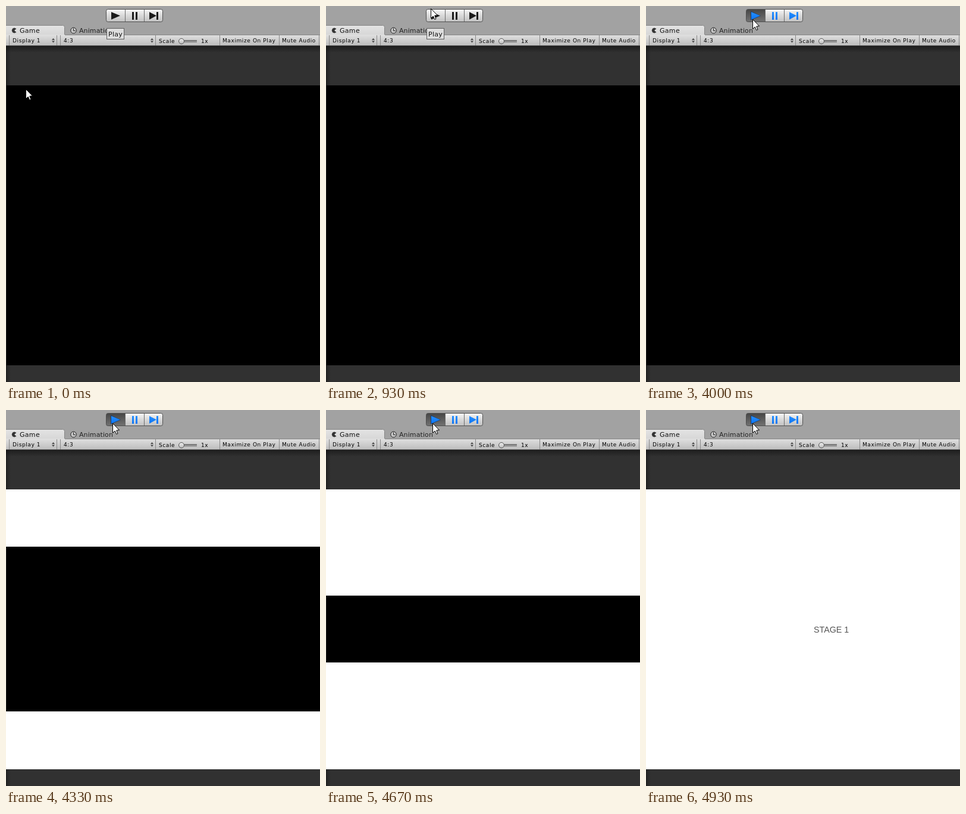
Recreate the animation shown at these times as an HTML page with a canvas. Size 528 by 630 pixels, loop 8000 ms.

```html
<!DOCTYPE html>
<html lang="en">
<head>
<meta charset="utf-8">
<style>
html, body { margin: 0; height: 100%; overflow: hidden; background: #313131; }
canvas { display: block; }
</style>
</head>
<body>
<canvas id="stage" width="528" height="630"></canvas>
<script>
const g = document.getElementById('stage').getContext('2d');
const LOOP = 8000;
const SANS = '"DejaVu Sans", sans-serif';

function rect(x, y, w, h, color) {
  g.fillStyle = color;
  g.fillRect(x, y, w, h);
}

function shape(color, ...pts) {
  g.fillStyle = color;
  g.beginPath();
  for (let i = 0; i < pts.length; i += 2) g.lineTo(pts[i], pts[i + 1]);
  g.closePath();
  g.fill();
}

function fade(x0, y0, x1, y1, ...colors) {
  const f = g.createLinearGradient(x0, y0, x1, y1);
  colors.forEach((c, i) => f.addColorStop(i / (colors.length - 1), c));
  return f;
}

function text(s, x, y, size, spacing, color = '#111', family = SANS) {
  g.font = `${size}px ${family}`;
  g.letterSpacing = spacing + 'px';
  g.fillStyle = color;
  g.fillText(s, x, y);
}

function circle(x, y, r) {
  g.beginPath();
  g.arc(x, y, r, 0, 7);
}

function tabs() {
  rect(0, 0, 528, 48, '#a2a2a2');
  g.fillStyle = fade(0, 32, 0, 49, '#e4e4e4', '#d6d6d6');
  g.strokeStyle = '#858585';
  g.lineWidth = 1;
  g.beginPath();
  g.roundRect(-4, 32.5, 102.5, 20, 3);
  g.fill();
  g.stroke();

  shape('#333', 14, 41, 17.5, 38, 14, 36.5, 11, 37.7, 9.6, 41, 11, 44.3, 14, 45.5, 17.5, 44);
  text('Game', 23, 45, 11, 0.3);

  g.strokeStyle = '#222';
  circle(113.5, 41, 4.8);
  g.fillStyle = '#c4c4c4';
  g.fill();
  g.stroke();
  g.beginPath();
  g.moveTo(113.5, 37.5);
  g.lineTo(113.5, 41.5);
  g.lineTo(116.5, 41.5);
  g.stroke();
  text('Animation', 123, 45, 11, 0.1, '#222');
}

function toolbar() {
  rect(0, 48, 528, 18, fade(0, 48, 0, 66, '#e0e0e0', '#bdbdbd'));
  rect(99, 48, 429, 1, '#868686');
  for (const x of [5, 85, 91, 251, 359, 459, 526]) rect(x, 49, 1, 17, '#8a8a8a');
  for (const x of [79.5, 245.5]) {
    shape('#444', x - 2.5, 57, x, 54, x + 2.5, 57);
    shape('#444', x - 2.5, 58.5, x, 61.5, x + 2.5, 58.5);
  }
  const label = (s, x, y = 61) => text(s, x, y, 9, 0.6, '#000');
  label('Display 1', 11);
  label('4:3', 97);
  label('Scale', 257, 62);
  label('1x', 328, 62);
  label('Maximize On Play', 364);
  label('Mute Audio', 464);

  rect(292, 57, 29, 4, '#777');
  rect(293, 59, 28, 1, '#aaa');
  circle(295, 59, 4.5);
  g.fillStyle = fade(0, 54, 0, 64, '#f4f4f4', '#b8b8b8');
  g.fill();
  g.strokeStyle = '#555';
  g.stroke();
}

function buttons(k) {
  const blue = k >= 60;
  const icon = blue ? fade(0, 9, 0, 23, '#2a92ff', '#0a74f4') : '#1a1a1a';
  g.save();
  g.beginPath();
  g.roundRect(168.5, 5.5, 95, 21, 3);
  g.clip();
  rect(168, 5, 96, 22, fade(0, 6, 0, 26, '#f6f6f6', '#d9d9d9', '#c2c2c2'));
  if (k >= 27) rect(168, 5, 32, 22, fade(0, 6, 0, 26, '#464646', '#5c5c5c', '#717171'));
  else if (k >= 25) rect(168, 5, 32, 22, fade(0, 6, 0, 26, '#666', '#7c7c7c', '#8e8e8e'));
  rect(200, 5, 1, 22, '#6c6c6c');
  rect(232, 5, 1, 22, '#6c6c6c');
  g.restore();
  g.strokeStyle = '#4e4e4e';
  g.beginPath();
  g.roundRect(168.5, 5.5, 95, 21, 3);
  g.stroke();

  if (blue) shape('#1b3a66', 176, 8.5, 193, 16.5, 176, 24);
  shape(icon, 177, 10, 192, 16.3, 177, 22.7);
  rect(212, 10, 3, 13, icon);
  rect(218, 10, 3, 13, icon);
  shape(icon, 241, 10, 253, 16.3, 241, 22.7);
  rect(253, 10, 3, 13, icon);
}

function view(k) {
  rect(0, 66, 528, 564, '#313131');
  rect(0, 66, 528, 12, fade(0, 66, 0, 78, '#1c1c1c', '#313131'));
  rect(0, 66, 8, 564, fade(0, 0, 8, 0, 'rgba(0,0,0,.3)', 'rgba(0,0,0,0)'));
  rect(0, 66, 528, 1, '#4a4a4a');
  rect(1, 133, 527, 469, '#000');
  if (k < 62) return;
  if (k >= 74) {
    rect(0, 133, 528, 469, '#fff');
    text('STAGE 1', 282, 372.5, 14.3, 0, '#555', '"Liberation Sans", Arial, sans-serif');
    return;
  }
  // White shutters start with a stall, then close evenly.
  const h = k < 65 ? 8 : Math.round(96 + 16.4 * (k - 65));
  rect(0, 133, 528, h, '#fff');
  rect(0, 601 - h, 528, h + 1, '#fff');
}

function tooltip() {
  rect(169, 37, 30, 19, '#5e5e5e');
  rect(170, 38, 28, 17, '#dedede');
  text('Play', 172, 51, 11, 0.3);
}

function pointer(k) {
  if (k >= 22) return [179, 22];
  if (k >= 21) return [178, 14];
  if (k >= 14) return [176, 4];
  const s = k / 13, u = 1 - s;
  return [
    33 * u * u - 66 * u * s + 171 * s * s,
    139 * u * u + 2 * 70 * u * s + 5 * s * s
  ].map(Math.round);
}

function cursor(x, y) {
  g.save();
  g.translate(x + 0.5, y + 0.5);
  shape('#fff', 0, 0, 0, 16, 3.7, 12.5, 6.2, 18, 8.5, 17, 6.2, 11.6, 11, 11.2);
  g.strokeStyle = '#000';
  g.lineWidth = 1;
  g.stroke();
  g.restore();
}

function draw(now) {
  const k = Math.floor((now % LOOP + 4) * 0.015);
  tabs();
  toolbar();
  buttons(k);
  view(k);
  if (k < 17) tooltip();
  cursor(...pointer(k));
  requestAnimationFrame(draw);
}

draw(0);
</script>
</body>
</html>
```
